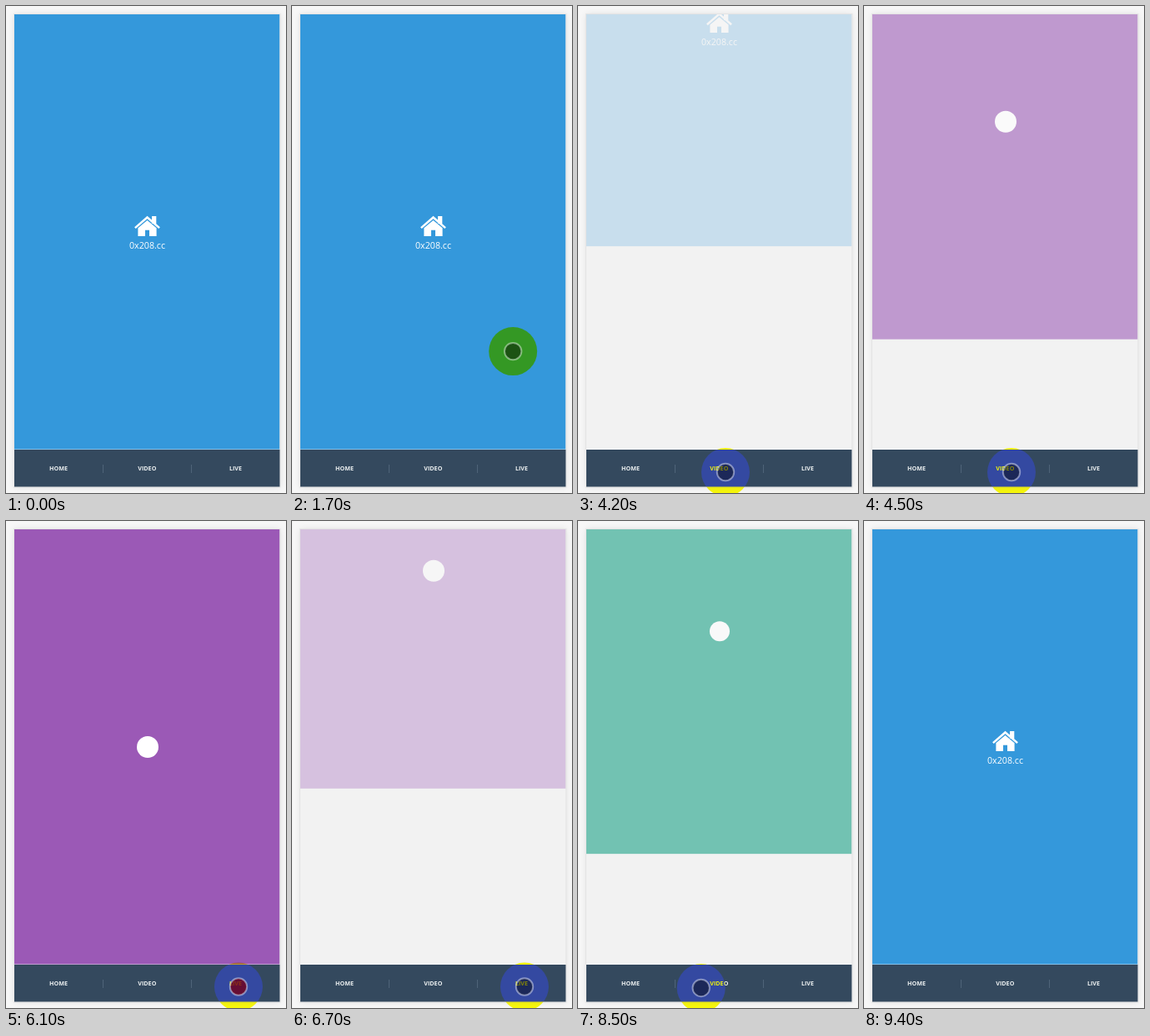
Write an HTML page with a canvas that moves like this. It is 336 px wide and 584 px high and loops after 9.9 s.

```html
<!DOCTYPE html>
<html lang="en">
<head>
<meta charset="utf-8">
<title>Page transitions</title>
<style>
  html, body { margin: 0; width: 100%; height: 100%; overflow: hidden; background: #f7f7f7; }
  canvas { display: block; width: 336px; height: 584px; }
</style>
</head>
<body>
<canvas id="stage"></canvas>
<script>
const W = 336, H = 584, LOOP = 9900, STEP = 100;
const PAGE = { x: 10, y: 10, w: 318.5, h: 522 };
const NAV = { y: 532, h: 44.5, tab: 106.2 };
const CENTER = 169.5;
const TRANSITION = 350;
const BACKDROP = 242;

const canvas = document.getElementById('stage');
const ratio = window.devicePixelRatio || 1;
canvas.width = W * ratio;
canvas.height = H * ratio;
const ctx = canvas.getContext('2d');
ctx.scale(ratio, ratio);

const pages = {
  home: { color: '#3498db', icon: drawHome },
  video: { color: '#9b59b6', icon: color => disc(170, 271, 13, color) },
  live: { color: '#16a085', icon: color => disc(170, 265, 12, color) }
};

// Each switch first slides the old page out, then the new one in.
const switches = [
  { at: 4033, from: 'home', to: 'video' },
  { at: 6562, from: 'video', to: 'live' },
  { at: 8410, from: 'live', to: 'home' }
];

const linear = k => k;

// The pointer sweeps in, visits the tabs, and sweeps out again.
const moves = [
  { start: 1050, end: 2600, to: [68, 558], via: [250, 500], pace: linear },
  { start: 3095, end: 3595, to: [177, 559], pace: ease },
  { start: 4700, end: 6000, to: [279, 558.5], pace: linear },
  { start: 7200, end: 8000, to: [65, 560], pace: ease },
  { start: 8300, end: 9400, to: [390, 180], via: [307, 602], pace: linear }
];

const mix = (a, b, k) => a + (b - a) * k;
const clamp = v => Math.max(0, Math.min(1, v));

// CSS "ease": cubic-bezier(.25, .1, .25, 1)
function ease(x) {
  x = clamp(x);
  if (x === 0 || x === 1) return x;
  const curve = (a, b, u) => 3 * a * u * (1 - u) ** 2 + 3 * b * u * u * (1 - u) + u ** 3;
  let lo = 0, hi = 1;
  for (let i = 0; i < 24; i++) {
    const mid = (lo + hi) / 2;
    if (curve(.25, .25, mid) < x) lo = mid; else hi = mid;
  }
  return curve(.1, 1, lo);
}

function disc(x, y, r, color) {
  ctx.fillStyle = color;
  ctx.beginPath();
  ctx.arc(x, y, r, 0, Math.PI * 2);
  ctx.fill();
}

// A symmetric peak with its tip at the page centre
function peak(top, halfWidth, drop) {
  ctx.beginPath();
  ctx.moveTo(CENTER - halfWidth, top + drop);
  ctx.lineTo(CENTER, top);
  ctx.lineTo(CENTER + halfWidth, top + drop);
}

function label(text, x, y, font, color) {
  ctx.font = font + ' "Open Sans", sans-serif';
  ctx.fillStyle = color;
  ctx.textAlign = 'center';
  ctx.fillText(text, x, y);
}

function drawHome(color) {
  ctx.fillStyle = ctx.strokeStyle = color;
  ctx.lineWidth = 2.5;
  peak(253.5, 14.6, 12.6);
  ctx.stroke();
  ctx.fillRect(175, 252, 5.3, 9);
  peak(257.1, 11.1, 9.2);
  ctx.lineTo(CENTER + 11.1, 276);
  ctx.lineTo(CENTER - 11.1, 276);
  ctx.rect(CENTER - 2.5, 268.7, 5, 7.3);
  ctx.fill('evenodd');
  label('0x208.cc', CENTER, 291, '10.7px', color);
}

function pageState(t) {
  let name = 'home', shown = 1;
  for (const s of switches) {
    if (t < s.at) break;
    const phase = (t - s.at) / TRANSITION;
    name = phase < 1 ? s.from : s.to;
    shown = phase < 1 ? 1 - ease(phase) : ease(phase - 1);
  }
  return { name, shown };
}

function drawPage(t) {
  const { name, shown } = pageState(t);
  const { color, icon } = pages[name];
  const white = Math.round(mix(BACKDROP, 255, shown));
  ctx.save();
  ctx.beginPath();
  ctx.rect(PAGE.x, PAGE.y, PAGE.w, PAGE.h);
  ctx.clip();
  ctx.translate(0, -0.6 * PAGE.h * (1 - shown));
  ctx.globalAlpha = shown;
  ctx.fillStyle = color;
  ctx.fillRect(PAGE.x, PAGE.y, PAGE.w, PAGE.h);
  // The page fades as one layer, so its icon blends with the backdrop only.
  ctx.globalAlpha = 1;
  icon(`rgb(${white},${white},${white})`);
  ctx.restore();
}

function drawFrame() {
  const height = NAV.y + NAV.h - PAGE.y;
  ctx.fillStyle = '#f7f7f7';
  ctx.fillRect(0, 0, W, H);
  ctx.save();
  ctx.shadowColor = 'rgba(0,0,0,.1)';
  ctx.shadowBlur = 8 * ratio;
  ctx.fillStyle = `rgb(${BACKDROP},${BACKDROP},${BACKDROP})`;
  ctx.fillRect(PAGE.x, PAGE.y, PAGE.w, height);
  ctx.restore();
  ctx.strokeStyle = '#e4e4e4';
  ctx.lineWidth = 1;
  ctx.strokeRect(PAGE.x - .5, PAGE.y - .5, PAGE.w + 1, height + 1);
}

function drawNav() {
  ctx.fillStyle = 'rgba(255,255,255,.4)';
  ctx.fillRect(PAGE.x, NAV.y - 1, PAGE.w, 1);
  ctx.fillStyle = '#34495e';
  ctx.fillRect(PAGE.x, NAV.y, PAGE.w, NAV.h);
  ['HOME', 'VIDEO', 'LIVE'].forEach((text, i) => {
    const left = PAGE.x + i * NAV.tab;
    label(text, left + NAV.tab / 2, 557, 'bold 7.2px', '#ecf0f1');
    if (i === 0) return;
    ctx.fillStyle = '#4f6479';
    ctx.fillRect(Math.floor(left), 550, 1, 10);
  });
}

function pointerAt(t) {
  let spot = [390, 215];
  for (const { start, end, to, via, pace } of moves) {
    if (t < start) break;
    const k = pace(clamp((t - start) / (end - start)));
    spot = spot.map((from, i) => {
      const bend = via ? via[i] : mix(from, to[i], .5);
      return mix(mix(from, bend, k), mix(bend, to[i], k), k);
    });
  }
  return spot;
}

function drawPointer(t) {
  const [x, y] = pointerAt(t);
  const pressed = switches.some(({ at }) => t >= at - 500 && t < at - 150);
  ctx.globalCompositeOperation = 'difference';
  disc(x, y, 29, '#00f');
  ctx.globalCompositeOperation = 'source-over';
  disc(x, y, 10, pressed ? 'rgba(115,0,25,.8)' : 'rgba(0,0,0,.45)');
  ctx.strokeStyle = 'rgba(255,255,255,.42)';
  ctx.lineWidth = 2;
  ctx.beginPath();
  ctx.arc(x, y, 10.2, 0, Math.PI * 2);
  ctx.stroke();
}

function render(now) {
  const t = Math.floor((now % LOOP) / STEP) * STEP;
  drawFrame();
  drawPage(t);
  drawNav();
  drawPointer(t);
}

const start = performance.now();
function tick() {
  render(performance.now() - start);
  requestAnimationFrame(tick);
}
tick();
</script>
</body>
</html>
```
